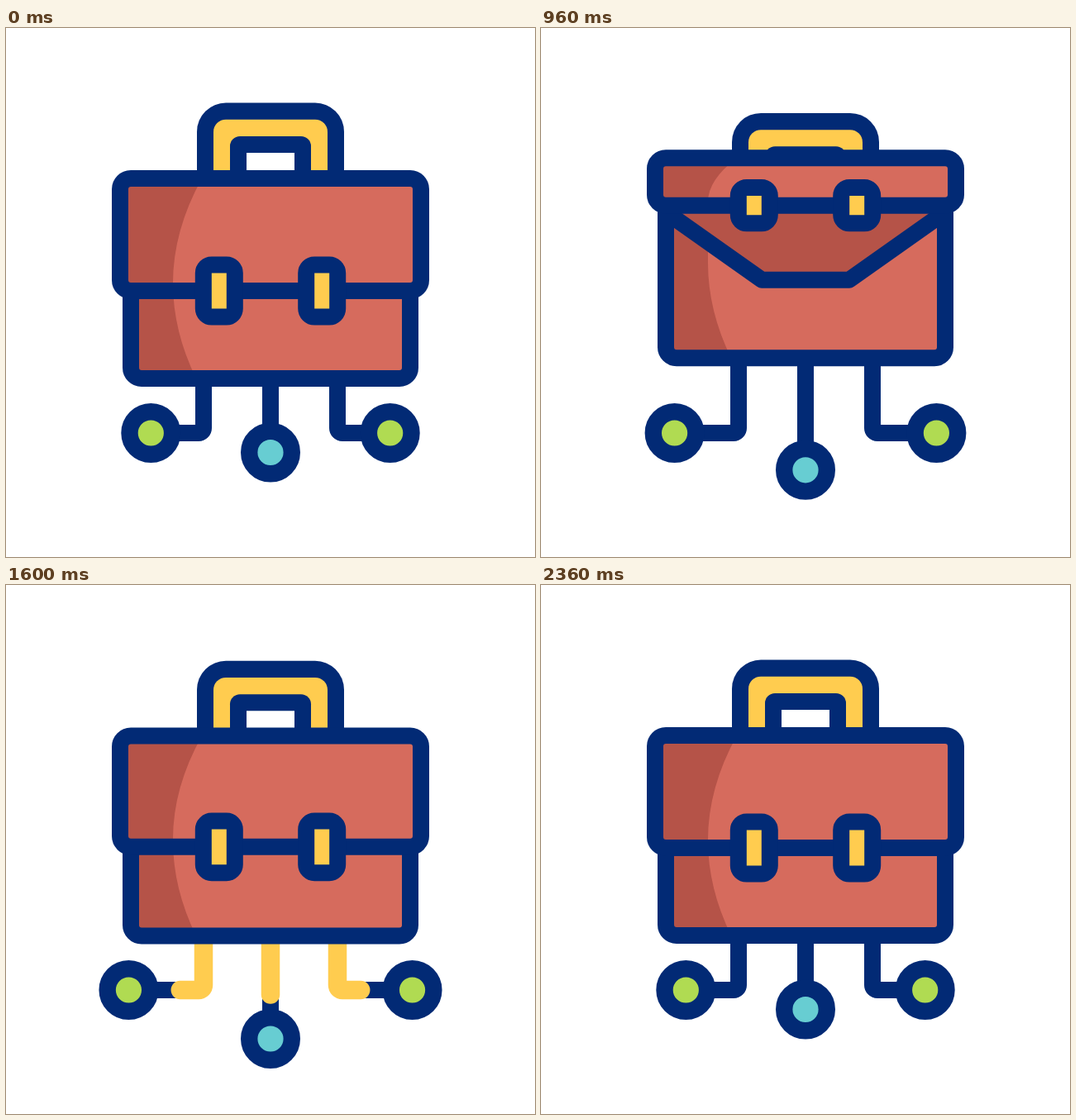
Animation of 640x640 px, one loop 2.58 s. Source, as an HTML page with a canvas:

```html
<!DOCTYPE html>
<html lang="en">
<head>
<meta charset="utf-8">
<title>Briefcase network</title>
<style>
html, body { margin: 0; height: 100%; overflow: hidden; background: #fff; }
canvas { display: block; width: 100vmin; height: 100vmin; }
</style>
</head>
<body>
<canvas id="stage" width="640" height="640"></canvas>
<script>
const ctx = document.getElementById('stage').getContext('2d');
const LOOP = 2580;
const NAVY = '#022a75', RED = '#d66b5d', DARK = '#b55348', YELLOW = '#ffcc4f',
      GREEN = '#b0db52', TEAL = '#67cdd2';

// Progress from 0 to 1 between two times, with three kinds of easing.
const progress = (t, from, to) => Math.min(1, Math.max(0, (t - from) / (to - from)));
const smooth = u => u * u * (3 - 2 * u);
const slowOut = (u, power) => 1 - (1 - u) ** power;
const ease = (t, from, to) => smooth(progress(t, from, to));
const glide = (t, from, to) => smooth(slowOut(progress(t, from, to), 2));

// The case squats, rises while opening, slams shut, recoils and settles;
// the nodes gather, reach out, light up as a pulse arrives, and return home.
function poseAt(t) {
  const squat = ease(t, 120, 360), rise = glide(t, 360, 1200), slam = ease(t, 1200, 1420),
        recoil = ease(t, 1420, 1715), settle = ease(t, 1715, 1860);
  const gather = ease(t, 120, 500), reach = slowOut(progress(t, 500, 1820), 2.5),
        home = ease(t, 1840, 2330);
  return {
    top: 172 + 9 * squat - 34.5 * rise + 45 * slam - 28.5 * recoil + 9 * settle,
    open: rise - 1.14 * slam + .24 * recoil - .1 * settle,
    spread: 144.7 - 12.5 * gather + 39.8 * reach - 27.3 * home,
    drop: 513.5 - 7 * gather + 43 * reach - 36 * home,
    glow: ease(t, 1600, 1730) - ease(t, 1950, 2220),
    head: ease(t, 1460, 1700),
    tail: ease(t, 1600, 1970)
  };
}

function paint(fill, stroke, width = 20) {
  if (fill) { ctx.fillStyle = fill; ctx.fill(); }
  if (stroke) { ctx.strokeStyle = stroke; ctx.lineWidth = width; ctx.stroke(); }
}

function rect(x, y, w, h, r, fill, stroke) {
  ctx.beginPath();
  ctx.roundRect(x, y, w, h, r);
  paint(fill, stroke);
}

// Red panel whose dark left side ends in a curve from topX via x = 202 to bottomX.
function panel(x, y, w, h, topX, bend, bottomX) {
  ctx.save();
  rect(x, y, w, h, 13, RED);
  ctx.clip();
  ctx.beginPath();
  ctx.moveTo(x, y);
  ctx.lineTo(topX, y);
  ctx.quadraticCurveTo(202, (y + bend) / 2, 202, bend);
  ctx.quadraticCurveTo(202, (bend + y + h) / 2, bottomX, y + h);
  ctx.lineTo(x, y + h);
  paint(DARK);
  ctx.restore();
}

function wire(points, { head, tail }) {
  const [start, end] = [points[0], points[points.length - 1]];
  const trace = () => {
    ctx.beginPath();
    ctx.moveTo(...start);
    if (points.length > 2) ctx.arcTo(...points[1], ...end, 6);
    ctx.lineTo(...end);
  };
  trace();
  paint(null, NAVY);
  if (head <= tail) return;

  const length = Math.abs(end[0] - start[0]) + end[1] - start[1];
  ctx.save();
  ctx.lineCap = 'round';
  ctx.setLineDash([(head - tail) * length, 2 * length]);
  ctx.lineDashOffset = -tail * length;
  trace();
  paint(null, YELLOW, 22.5);
  ctx.restore();
}

function node(x, y, fill, glow) {
  const mix = (a, b) => Math.round(a + (b - a) * glow);
  ctx.beginPath();
  ctx.arc(x, y, 25.8, 0, 2 * Math.PI);
  paint(fill, `rgb(${mix(2, 106)},${mix(42, 101)},${mix(117, 249)})`, 20.4 + 3 * glow);
}

function drawNetwork(pose) {
  const start = pose.top + 232;
  for (const side of [-1, 1]) {
    const x = 320 + side * 81, end = 320 + side * pose.spread;
    wire([[x, start], [x, 490], [end, 490]], pose);
    node(end, 490, GREEN, pose.glow);
  }
  wire([[320, start], [320, pose.drop]], pose);
  node(320, pose.drop, TEAL, pose.glow);
}

// Nested bands, each 20 further in; the case hides their lower ends.
function drawHandle(y) {
  [[NAVY, 35], [YELLOW, 15], [NAVY, 12], ['#fff', 0]].forEach(([color, radius], i) =>
    rect(231 + 20 * i, y + 20.2 * i, 178 - 40 * i, 150 - 20 * i, radius, color));
}

function drawCase(open) {
  const line = 146 - 80 * open, foldY = 133.5 + 24.5 * open;

  panel(151, 40, 338, 212, 202, 137, 230);
  // Inner fold, seen while the flap is raised
  ctx.beginPath();
  ctx.moveTo(151, 75.5);
  ctx.lineTo(267, foldY);
  ctx.lineTo(373, foldY);
  ctx.lineTo(489, 75.5);
  paint(DARK, NAVY);
  rect(151, 40, 338, 212, 13, null, NAVY);

  panel(138, 10, 364, line - 10, 237, line * .935, 202);
  rect(138, 10, 364, line - 10, 13, null, NAVY);

  const claspHeight = 63 - 20 * open;
  for (const side of [-1, 1]) {
    rect(301 + side * 62.2, line - claspHeight / 2, 38, claspHeight, 10, YELLOW, NAVY);
  }
}

function draw(t) {
  const pose = poseAt(t);
  ctx.fillStyle = '#fff';
  ctx.fillRect(0, 0, 640, 640);
  ctx.lineJoin = 'round';
  drawNetwork(pose);
  drawHandle(pose.top - 81.5 + 38 * Math.max(0, pose.open));
  ctx.save();
  ctx.translate(0, pose.top);
  drawCase(pose.open);
  ctx.restore();
}

const began = performance.now();
function tick() {
  draw((performance.now() - began) % LOOP);
  requestAnimationFrame(tick);
}
tick();
</script>
</body>
</html>
```
